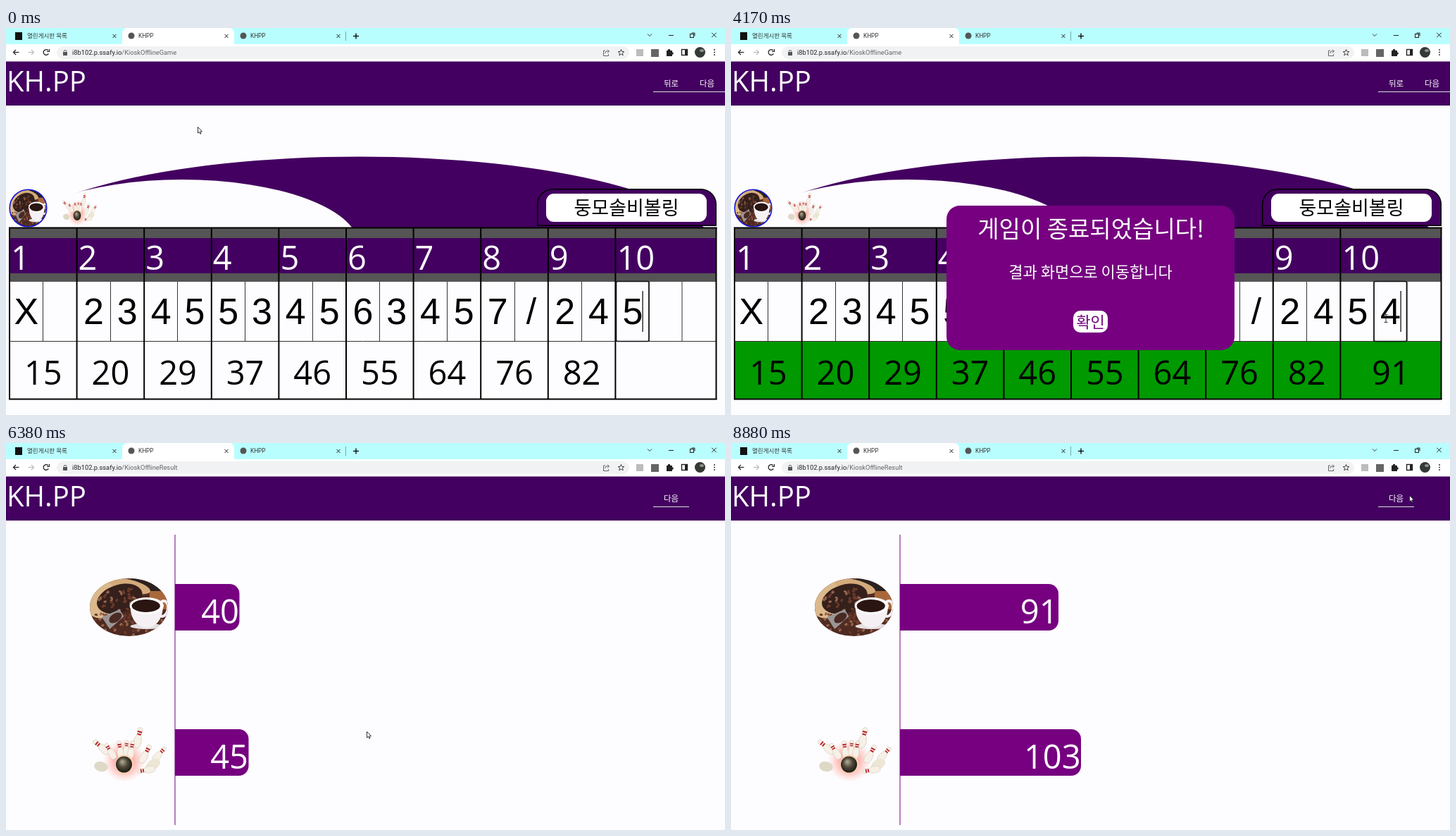
An HTML page with a canvas for the animation above (8.91 s loop, 1021 by 549 pixels).

```html
<!DOCTYPE html>
<html lang="ko">
<head>
<meta charset="utf-8">
<title>Bowling score board</title>
<style>
html, body { margin: 0; width: 100%; height: 100%; overflow: hidden; background: #fdfcfe; }
canvas { display: block; width: 100vw; height: 100vh; }
</style>
</head>
<body>
<canvas id="stage" width="1021" height="549"></canvas>
<script>
const ctx = document.getElementById('stage').getContext('2d');
const LOOP = 8910;
const PAGE = '#fdfcfe', INDIGO = '#430060', PURPLE = '#760080', BLACK = '#000';
const SANS = '"Open Sans", "Noto Sans", sans-serif';
const UI = 'Roboto, "Noto Sans CJK KR", sans-serif';
const KR = '"Noto Sans CJK KR", "Noto Sans CJK", sans-serif';
const ARIAL = '"Liberation Sans", sans-serif';

// Times of the main events, ms
const FOCUS_NEXT = 3370, TYPED = 3810, POPUP = 3840, POPUP_END = 5420;
const RESULT = 5780, NEW_URL = 5880;

const colX = i => i < 10 ? 5 + 95.6 * i : 1008.5;
const ROLLS = ['X ', '23', '45', '53', '45', '63', '45', '7/', '24'];
const TOTALS = [15, 20, 29, 37, 46, 55, 64, 76, 82];

const POINTER = [
  [0, 272, 140], [740, 320, 150], [940, 320, 150], [1000, 321, 152], [1910, 321, 152],
  [2770, 925, 400], [3140, 930, 404], [3600, 930, 404], [3610, 930, 408], [3900, 930, 408],
  [4100, 930, 412], [4710, 930, 412], [5350, 512, 409], [6680, 512, 409],
  [7140, 947, 153], [7540, 963, 74], [LOOP, 963, 74]
];

const clamp = v => Math.max(0, Math.min(1, v));
const lerp = (a, b, p) => a + (b - a) * p;
const smooth = p => p * p * (3 - 2 * p);
const random = n => Math.abs(Math.sin(n * 12.9898) * 43758.5453) % 1;

function track(keys, t) {
  const i = Math.max(1, keys.findIndex(k => k[0] >= t));
  const a = keys[i - 1], b = keys[i];
  const p = smooth(clamp((t - a[0]) / (b[0] - a[0])));
  return [lerp(a[1], b[1], p), lerp(a[2], b[2], p)];
}

function rect(x, y, w, h, fill) {
  ctx.fillStyle = fill;
  ctx.fillRect(x, y, w, h);
}

function round(x, y, w, h, r, fill) {
  ctx.beginPath();
  ctx.roundRect(x, y, w, h, r);
  ctx.fillStyle = fill;
  ctx.fill();
}

function oval(x, y, rx, ry, fill, turn = 0) {
  ctx.beginPath();
  ctx.ellipse(x, y, rx, ry, turn, 0, 7);
  ctx.fillStyle = fill;
  ctx.fill();
}

function line(points, color, width = 1) {
  ctx.beginPath();
  for (let i = 0; i < points.length; i += 2) ctx.lineTo(points[i], points[i + 1]);
  ctx.strokeStyle = color;
  ctx.lineWidth = width;
  ctx.stroke();
}

function text(s, x, y, size, family, fill, align = 'left', base = 'alphabetic') {
  ctx.font = size + 'px ' + family;
  ctx.textAlign = align;
  ctx.textBaseline = base;
  ctx.fillStyle = fill;
  ctx.fillText(s, x, y);
}

function cross(x, y, r) {
  line([x - r, y - r, x + r, y + r], '#222');
  line([x + r, y - r, x - r, y + r], '#222');
}

function tabStrip() {
  rect(0, 0, 1021, 23, '#b9feff');
  round(165, 0, 159, 24, [7, 7, 0, 0], '#fff');
  rect(13, 6, 10, 11, '#111');
  text('열린게시판 목록', 30, 14, 8.5, UI, '#333');
  for (const x of [172, 331]) {
    oval(x + 6, 11, 4.5, 4.5, '#555');
    text('KHPP', x + 16, 14, 8.3, UI, '#333');
  }
  for (const x of [154, 313, 472]) cross(x, 11.5, 2.5);
  line([482.5, 5, 482.5, 18], '#7aa');
  line([493, 11.5, 501, 11.5], BLACK, 1.3);
  line([497, 7.5, 497, 15.5], BLACK, 1.3);
  line([911, 8.5, 914, 11.5, 917, 8.5], '#333');
  line([941, 10.5, 948, 10.5], '#222');
  ctx.strokeRect(971.5, 8.5, 5, 5);
  line([973.5, 7, 978, 7, 978, 11.5], '#222');
  cross(1005.5, 10, 3.2);
}

function toolbar(t) {
  rect(0, 23, 1021, 25, '#fff');
  line([18.5, 34.5, 10.5, 34.5], '#222', 1.2);
  line([14, 31, 10.5, 34.5, 14, 38], '#222', 1.2);
  line([31.5, 34.5, 39.5, 34.5], '#bbb', 1.2);
  line([36, 31, 39.5, 34.5, 36, 38], '#bbb', 1.2);
  ctx.beginPath();
  ctx.arc(57, 34.5, 3.8, 0.5, 5.6);
  ctx.strokeStyle = '#222';
  ctx.lineWidth = 1.3;
  ctx.stroke();
  line([61.5, 30, 61.5, 33.5, 58, 33.5], '#222', 1.2);

  round(72, 26, 813, 18, 9, '#f1f2f3');
  rect(81, 34, 6, 5, '#555');
  ctx.beginPath();
  ctx.arc(84, 33.5, 2, Math.PI, 0);
  ctx.strokeStyle = '#555';
  ctx.lineWidth = 1;
  ctx.stroke();
  const host = 'i8b102.p.ssafy.io';
  text(host, 94, 38, 9.3, UI, '#222');
  const path = t < NEW_URL ? '/KioskOfflineGame' : '/KioskOfflineResult';
  text(path, 94 + ctx.measureText(host).width, 38, 9.3, UI, '#666');

  line([851, 32, 848.5, 32, 848.5, 39.5, 855.5, 39.5, 855.5, 37], '#666');
  line([850.5, 36, 852, 33, 856.5, 33], '#666');
  line([854, 30.5, 856.5, 33, 854, 35.5], '#666');
  const star = [];
  for (let i = 0; i <= 10; i++) {
    const r = i % 2 ? 2 : 4.6, a = i * Math.PI / 5 - Math.PI / 2;
    star.push(873.5 + r * Math.cos(a), 35 + r * Math.sin(a));
  }
  line(star, '#444');
  rect(895, 30, 10, 10, '#bcbcbc');
  rect(916, 30, 11, 11, '#656565');
  rect(938, 32, 8, 8, '#222');
  oval(941.5, 31.5, 1.8, 1.8, '#222');
  oval(946, 36, 1.8, 1.8, '#222');
  ctx.strokeStyle = '#222';
  ctx.lineWidth = 1.4;
  ctx.strokeRect(959.5, 30.5, 8, 8);
  rect(964, 30, 4, 9, '#222');
  oval(985.5, 34.5, 7.5, 7.5, '#343a36');
  oval(988, 32, 3, 2, '#89908a');
  for (const y of [31, 34.5, 38]) oval(1006, y, 1, 1, '#333');
}

function header(links) {
  rect(0, 47.5, 1021, 62.5, INDIGO);
  text('KH.PP', 1, 90, 40, SANS, '#fff');
  links.forEach((s, i) => text(s, 944.5 + i * 51, 78.5, 11.5, KR, '#fff', 'center', 'middle'));
  line([919, 90.5, 919 + links.length * 51, 90.5], '#ddd');
}

// Simplified coffee picture, drawn in a 110 x 82 box
function coffee(x, y, w, h) {
  ctx.save();
  ctx.translate(x, y);
  ctx.scale(w / 110, h / 82);
  ctx.beginPath();
  ctx.ellipse(55, 41, 55, 41, 0, 0, 7);
  ctx.clip();
  rect(0, 0, 110, 82, '#4f2a20');
  rect(58, 0, 52, 20, '#2b211f');
  rect(84, 18, 26, 26, '#a9683b');
  oval(24, 30, 32, 24, '#dcb98c', -0.6);
  oval(56, 11, 30, 9, '#d3ab7b', 0.25);
  oval(42, 29, 33, 20, '#35201b', -0.3);
  for (let i = 0; i < 190; i++) {
    const bx = random(i + 1) * 110, by = 14 + random(i + 300) * 68;
    const inSack = Math.hypot((bx - 42) / 30, (by - 29) / 18) < 1;
    if (by > 50 || inSack) oval(bx, by, 2.4, 1.6, i % 3 ? '#6b3a2b' : '#976650', i);
  }
  ctx.beginPath();
  ctx.moveTo(17, 55);
  ctx.lineTo(42, 44);
  ctx.lineTo(48, 54);
  ctx.lineTo(28, 72);
  ctx.closePath();
  ctx.fillStyle = '#9b9596';
  ctx.fill();
  oval(36, 56, 10, 6, '#4a2a22', -0.6);
  ctx.beginPath();
  ctx.ellipse(103, 43, 7, 11, 0.2, 0, 7);
  ctx.strokeStyle = '#f4f0f2';
  ctx.lineWidth = 4;
  ctx.stroke();
  oval(80, 68, 23, 4, '#e5dfe1');
  ctx.beginPath();
  ctx.moveTo(57, 40);
  ctx.bezierCurveTo(58, 80, 102, 80, 103, 40);
  ctx.fillStyle = '#f4f0f4';
  ctx.fill();
  oval(80, 39, 24, 12, '#fff');
  oval(79, 39, 20, 9, '#2a1512');
  ctx.restore();
}

function pin(x, y, deg, size = 1) {
  ctx.save();
  ctx.translate(x, y);
  ctx.rotate(deg * Math.PI / 180);
  ctx.scale(size, size);
  ctx.beginPath();
  ctx.moveTo(0, -14);
  ctx.bezierCurveTo(5, -14, 3, -7, 2.5, -4);
  ctx.bezierCurveTo(6, 2, 6, 10, 3, 14);
  ctx.lineTo(-3, 14);
  ctx.bezierCurveTo(-6, 10, -6, 2, -2.5, -4);
  ctx.bezierCurveTo(-3, -7, -5, -14, 0, -14);
  ctx.fillStyle = '#f6f0e6';
  ctx.fill();
  ctx.strokeStyle = '#d8cdbf';
  ctx.lineWidth = 0.7;
  ctx.stroke();
  rect(-3, -9, 6, 2, '#b3262c');
  rect(-2.6, -5.5, 5.2, 2, '#b3262c');
  ctx.restore();
}

// Pins and ball, drawn in a 106 x 71 box
function strike(x, y, w, h) {
  ctx.save();
  ctx.translate(x, y);
  ctx.scale(w / 106, h / 71);
  const glow = ctx.createRadialGradient(45, 48, 5, 45, 48, 31);
  glow.addColorStop(0, '#ff8080');
  glow.addColorStop(0.6, '#ffb0a880');
  glow.addColorStop(1, '#ffd8d000');
  oval(45, 46, 31, 31, glow);
  oval(12, 56, 10, 7, '#ded9c6', 0.2);
  pin(65, 15, 14, 1.05);
  pin(12, 28, -50);
  pin(25, 34, -32, 0.9);
  pin(39, 32, -8, 0.9);
  pin(48, 30, 3, 0.8);
  pin(55, 32, 10, 0.9);
  pin(75, 38, 28);
  pin(95, 38, 42, 0.9);
  oval(86, 53, 11, 7, '#ece6d4', -0.5);
  pin(76, 61, -100, 0.9);
  oval(45, 53, 13.5, 13.5, '#ffd0b0');
  const ball = ctx.createRadialGradient(42, 49, 1, 44, 52, 12);
  ball.addColorStop(0, '#aaa38a');
  ball.addColorStop(0.5, '#514b3c');
  ball.addColorStop(1, '#201d18');
  oval(44.5, 53, 11.5, 11.5, ball);
  ctx.restore();
}

function backdrop() {
  ctx.save();
  ctx.beginPath();
  ctx.rect(0, 111, 1021, 172);
  ctx.clip();
  oval(501.5, 311, 501.5, 128.5, INDIGO);
  oval(250, 309, 251, 94, PAGE);
  ctx.restore();
}

function players() {
  coffee(5, 229, 53, 53);
  ctx.beginPath();
  ctx.arc(31.5, 255.5, 26.3, 0, 7);
  ctx.strokeStyle = '#1616d8';
  ctx.lineWidth = 1.6;
  ctx.stroke();
  strike(80, 234, 50, 43);

  round(754, 228, 255, 53, [22, 22, 0, 0], BLACK);
  round(755.5, 229.5, 252, 50, [20.5, 20.5, 0, 0], INDIGO);
  round(767, 235, 228, 40, 11, '#fff');
  text('둥모솔비볼링', 881, 255, 27, KR, BLACK, 'center', 'middle');
}

function roll(s, x) {
  text(s, x, 420, 52, ARIAL, BLACK, 'center');
}

function caretOn(t) {
  const start = t < FOCUS_NEXT ? -20 : t < TYPED ? FOCUS_NEXT : TYPED;
  return Math.floor((t - start) / 515) % 2 === 0;
}

function scoreTable(t) {
  const done = t >= TYPED;
  rect(5, 283, 1004, 77, '#555');
  rect(5, 298, 1004, 50, INDIGO);
  rect(5, 360, 1004, 84, PAGE);
  rect(5, 444, 1004, 83, done ? '#009900' : PAGE);
  line([5, 444.5, 1008, 444.5], '#333');

  for (let i = 0; i < 10; i++) {
    const x = colX(i), end = colX(i + 1), mid = (x + end) / 2;
    text(i + 1, x + 2, 343, 47, SANS, '#fff');
    if (i < 9) {
      const divider = Math.floor(mid) + 0.5;
      line([divider, 360, divider, 444], '#333');
      roll(ROLLS[i][0], (x + mid) / 2);
      roll(ROLLS[i][1], (mid + end) / 2);
    }
    const total = i < 9 ? TOTALS[i] : done ? 91 : '';
    text(total, mid, 506, 47, SANS, BLACK, 'center');
  }
  for (const x of [913, 960]) line([x, 360, x, 444], '#333');
  for (let i = 0; i <= 10; i++) line([colX(i), 283, colX(i), 527], BLACK, 2);
  line([4, 283.5, 1009.5, 283.5], BLACK, 2);
  line([4, 526.5, 1009.5, 526.5], BLACK, 2);

  const second = t >= FOCUS_NEXT;
  roll('5', 890);
  if (done) roll('4', 936.5);
  ctx.beginPath();
  ctx.roundRect(second ? 913 : 866.5, 359.5, 46.5, 85, 2);
  ctx.strokeStyle = '#101010';
  ctx.lineWidth = 1.6;
  ctx.stroke();
  const caretX = !second ? 904 : done ? 951 : 936;
  if (caretOn(t)) rect(caretX - 0.5, 373, 1.2, 58, BLACK);
}

function popupScale(p) {
  if (p < 0.45) return lerp(0.7, 1.05, p / 0.45);
  if (p < 0.8) return lerp(1.05, 0.95, (p - 0.45) / 0.35);
  return lerp(0.95, 1, (p - 0.8) / 0.2);
}

function popup(t) {
  const out = clamp((t - POPUP_END) / 150);
  if (t < POPUP || out === 1) return;
  const scale = popupScale(clamp((t - POPUP) / 300)) * (1 - out / 2);
  ctx.save();
  ctx.globalAlpha = 1 - out;
  ctx.translate(510.5, 354.5);
  ctx.scale(scale, scale);
  ctx.translate(-510.5, -354.5);
  round(306, 252, 409, 205, 19, PURPLE);
  text('게임이 종료되었습니다!', 511, 284, 33, KR, '#fff', 'center', 'middle');
  text('결과 화면으로 이동합니다', 510.5, 345.5, 22, KR, '#fff', 'center', 'middle');
  round(486, 401, 49, 31, 10, '#fff');
  text('확인', 510.5, 416.5, 22, KR, PURPLE, 'center', 'middle');
  ctx.restore();
}

function bar(y, width, count) {
  ctx.save();
  const r = Math.min(14, width);
  round(240, y, width, 66, [0, r, r, 0], PURPLE);
  ctx.clip();
  ctx.font = '47px ' + SANS;
  const right = 240 + Math.max(width, ctx.measureText(count).width);
  text(count, right - 0.5, y + 55.5, 47, SANS, '#fff', 'right');
  ctx.restore();
}

function gamePage(t) {
  header(['뒤로', '다음']);
  backdrop();
  players();
  scoreTable(t);
  popup(t);
}

function resultPage(t) {
  header(['다음']);
  coffee(119, 192, 111, 82);
  strike(123, 403, 106, 71);
  line([240, 130, 240, 542], '#8b2b96', 1.2);
  const grow = clamp((t - 5763) / 1520);
  bar(200, 225 * grow, Math.floor(91 * clamp((t - 5771) / 1380)));
  bar(406, 257 * grow, Math.floor(103 * clamp((t - 5785) / 1350)));
}

function pointer(t) {
  const [x, y] = track(POINTER, t);
  const popupOpen = t >= POPUP && t < POPUP_END + 150;
  const overPopup = popupOpen && x > 306 && x < 715;
  if (t < POPUP_END && y > 360 && y < 444 && !overPopup) {
    line([x, y - 5, x, y + 5], '#333');
    line([x - 2.5, y - 5.5, x + 2.5, y - 5.5], '#333');
    line([x - 2.5, y + 5.5, x + 2.5, y + 5.5], '#333');
    return;
  }
  ctx.save();
  ctx.translate(x + 0.5, y + 0.5);
  ctx.beginPath();
  for (const [px, py] of [[0, 0], [0, 8.6], [2, 6.9], [3.3, 9.8], [4.6, 9.2], [3.4, 6.4], [6, 6.2]]) {
    ctx.lineTo(px, py);
  }
  ctx.closePath();
  ctx.fillStyle = '#fff';
  ctx.fill();
  ctx.strokeStyle = '#222';
  ctx.lineWidth = 0.9;
  ctx.stroke();
  ctx.restore();
}

function draw(t) {
  rect(0, 0, 1021, 549, PAGE);
  tabStrip();
  toolbar(t);
  if (t < RESULT) gamePage(t);
  else resultPage(t);
  pointer(t);
}

const begin = performance.now();
function tick() {
  draw((performance.now() - begin) % LOOP);
  requestAnimationFrame(tick);
}
tick();
</script>
</body>
</html>
```
